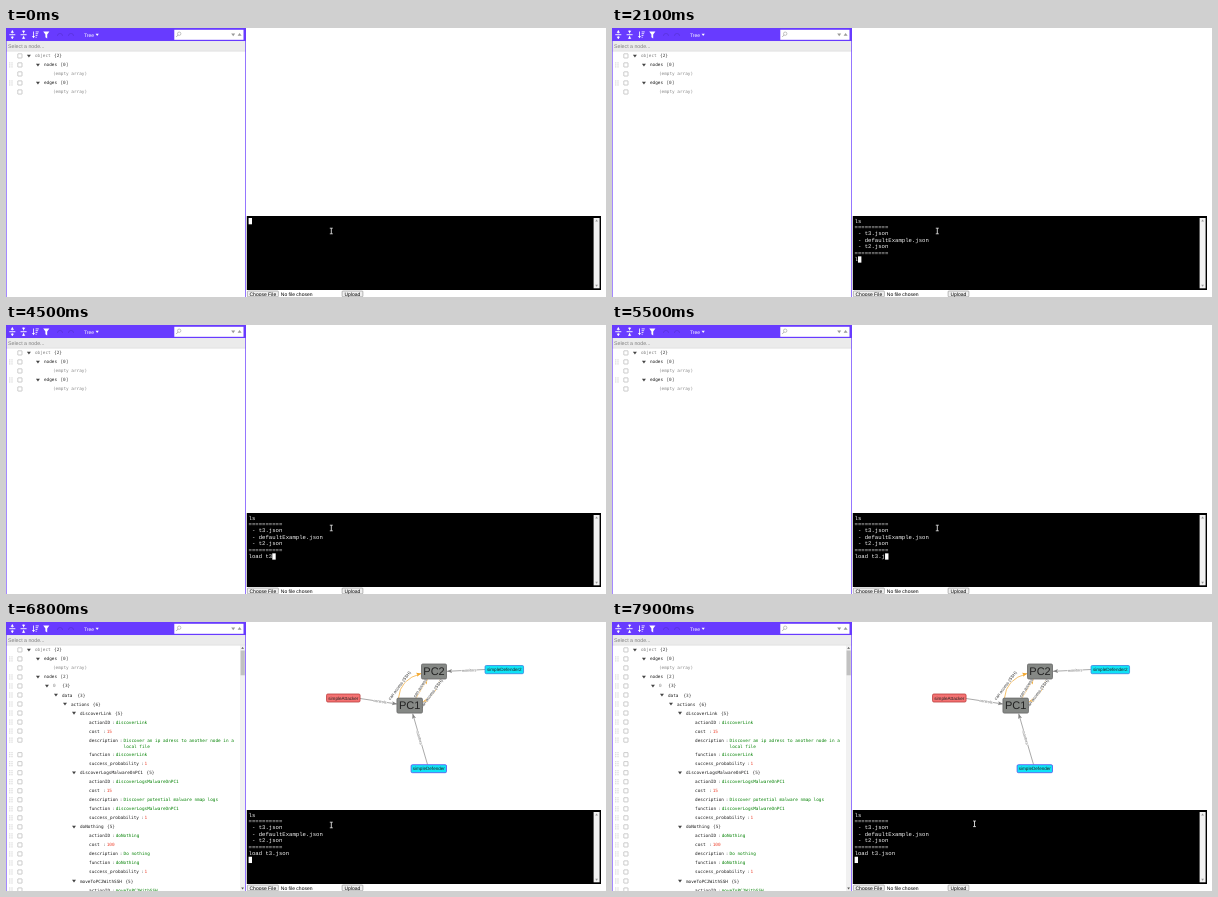
Animation, 600 px wide and 269 px high, one loop 8000 ms. Source, as an HTML page with a canvas:

```html
<!DOCTYPE html>
<html lang="en">
<head>
<meta charset="utf-8">
<title>Graph editor</title>
<style>
html, body { margin: 0; width: 100%; height: 100%; overflow: hidden; background: #fff; }
canvas { display: block; }
</style>
</head>
<body>
<canvas id="stage" width="600" height="269"></canvas>
<script>
const ctx = document.getElementById("stage").getContext("2d");
ctx.textRendering = "geometricPrecision";

const LOOP = 8000, LOADED = 6800;
const PURPLE = "#683bff", GREY = "#848484", ORANGE = "#f2a62b";
const SANS = '"Liberation Sans", Arial, sans-serif';
const TREE = '4.37px "DejaVu Sans Mono", monospace';
const TERM = '5.64px "Liberation Mono", monospace';
const CHAR = 2.63, ROW = 9.02;

function text(s, x, y, color, font, align = "left") {
  ctx.font = font;
  ctx.fillStyle = color;
  ctx.textAlign = align;
  ctx.fillText(s, x, y);
}
function rect(x, y, w, h, color) {
  ctx.fillStyle = color;
  ctx.fillRect(x, y, w, h);
}
function poly(color, ...points) {
  ctx.beginPath();
  for (let i = 0; i < points.length; i += 2) ctx.lineTo(points[i], points[i + 1]);
  ctx.fillStyle = color;
  ctx.fill();
}
function line(color, width, ...points) {
  ctx.beginPath();
  for (let i = 0; i < points.length; i += 2) ctx.lineTo(points[i], points[i + 1]);
  ctx.strokeStyle = color;
  ctx.lineWidth = width;
  ctx.stroke();
}
function box(x, y, w, h, fill, stroke, width, radius) {
  ctx.beginPath();
  ctx.roundRect(x, y, w, h, radius);
  ctx.fillStyle = fill;
  ctx.fill();
  ctx.strokeStyle = stroke;
  ctx.lineWidth = width;
  ctx.stroke();
}
// Triangle of half width r; dir 1 points down, -1 up
function tri(x, y, r, dir, color) {
  poly(color, x - r, y - dir * r * 0.6, x + r, y - dir * r * 0.6, x, y + dir * r * 0.8);
}

function toolbar() {
  rect(0, 0, 240, 13.2, PURPLE);
  for (const [x, dir] of [[6.3, 1], [17.6, -1]]) {
    line("#fff", 0.9, x - 3, 6.7, x + 3, 6.7);
    for (const side of [-1, 1]) {
      tri(x, 6.7 + side * 3, 1.7, side * dir, "#fff");
      line("#fff", 0.7, x, 6.7 + side * 1.2, x, 6.7 + side * 4.3);
    }
  }
  line("#fff", 0.8, 27.5, 3.5, 27.5, 9);
  tri(27.5, 9, 1.5, 1, "#fff");
  for (let i = 0; i < 4; i++) line("#fff", 0.8, 29.6, 3.9 + i * 1.8, 32.8 - i * 0.7, 3.9 + i * 1.8);
  poly("#fff", 37.2, 3.4, 43.4, 3.4, 41.2, 6.6, 41.2, 10.4, 39.4, 9.2, 39.4, 6.6);
  ctx.globalAlpha = 0.12;
  for (const x of [54, 65]) {
    ctx.beginPath();
    ctx.arc(x, 8, 2.6, Math.PI, 0);
    ctx.lineWidth = 0.9;
    ctx.strokeStyle = "#000";
    ctx.stroke();
  }
  ctx.globalAlpha = 1;
  text("Tree", 78, 8.6, "#fff", "5.01px " + SANS);
  tri(91.2, 6.8, 1.6, 1, "#fff");

  rect(168.3, 1.8, 69.2, 10, "#fff");
  ctx.beginPath();
  ctx.arc(173.2, 5.7, 1.7, 0, 7);
  ctx.strokeStyle = "#aaa";
  ctx.lineWidth = 0.7;
  ctx.stroke();
  line("#aaa", 0.8, 172, 7, 170.2, 9);
  tri(227.2, 6.6, 2, 1, "#999");
  tri(233.6, 6.6, 2, -1, "#999");

  rect(0, 13.2, 240, 10, "#ebebeb");
  line("#d3d3d3", 0.5, 0, 23.2, 240, 23.2);
  text("Select a node...", 2, 20.2, "#808080", "5.26px " + SANS);
}

// Rows: [level, name, value]; a value in brackets is a child count
const emptyRow = [2, "", "(empty array)"];
const blankTree = [[0, "object", "{2}"], [1, "nodes", "[0]"], emptyRow, [1, "edges", "[0]"], emptyRow];

const action = (name, cost, description) => [
  [5, name, "{5}"],
  [6, "actionID", name],
  [6, "cost", cost],
  [6, "description", description],
  [6, "function", name],
  [6, "success_probability", 1],
];
const fullTree = [
  [0, "object", "{2}"], [1, "edges", "[0]"], emptyRow, [1, "nodes", "[2]"],
  [2, "0", "{3}"], [3, "data", "{3}"], [4, "actions", "{6}"],
  ...action("discoverLink", 15, "Discover an ip adress to another node in a\nlocal file"),
  ...action("discoverLogsMalwareOnPC1", 15, "Discover potential malware nmap logs"),
  ...action("doNothing", 100, "Do nothing"),
  ...action("moveToPC2WithSSH", 15, "Move").slice(0, 2),
];

function drawTree(rows) {
  let y = 27.9;
  for (const [level, name, value] of rows) {
    const x = 28.9 + level * ROW, base = y + 1.5;
    const branch = /^[{[]/.test(value);
    box(11.8, y - 2.1, 4.2, 4.2, "#fff", "#aaa", 0.6, 0.3);
    if (level && name) {
      for (let i = 0; i < 6; i++) rect(3.3 + (i % 2) * 2.2, y - 2.5 + (i >> 1) * 2, 1, 1, "#c4c4c4");
    }
    if (branch) tri(x - 6, y, 2, 1, "#444");

    const isIndex = name === "0";
    const end = x + Math.max(isIndex ? 6 : 12.03, name.length * CHAR);
    text(name, x, base, isIndex || !level ? "#808080" : "#1a1a1a", TREE);
    if (!name) {
      text(value, x, base, "#888", TREE);
    } else if (branch) {
      text(value, end + 3.4, base, "#333", TREE);
    } else {
      text(":", end + 1.9, base, "#555", TREE);
      const color = typeof value === "number" ? "#ee422e" : "#008000";
      String(value).split("\n").forEach((part, i) => {
        if (i) y += 5.6;
        text(part, end + 5.6, base + i * 6, color, TREE);
      });
    }
    y += ROW;
  }
}

function treeScrollbar() {
  rect(234, 23.4, 5.2, 246, "#f1f1f1");
  rect(234.6, 28.5, 4.2, 24.8, "#c1c1c1");
  tri(236.6, 26, 1.4, -1, "#555");
  tri(236.6, 266.3, 1.4, 1, "#555");
}

function arrowHead(x, y, angle, color) {
  ctx.save();
  ctx.translate(x, y);
  ctx.rotate(angle);
  poly(color, 0, 0, -5, -2, -4, 0, -5, 2);
  ctx.restore();
}
function edge(x1, y1, cx, cy, x2, y2, color) {
  ctx.beginPath();
  ctx.moveTo(x1, y1);
  ctx.quadraticCurveTo(cx, cy, x2, y2);
  ctx.strokeStyle = color;
  ctx.lineWidth = 0.7;
  ctx.stroke();
  arrowHead(x2, y2, Math.atan2(y2 - cy, x2 - cx), color);
}
function edgeLabel(s, x, y, degrees, size, color) {
  ctx.save();
  ctx.translate(x, y);
  ctx.rotate(degrees * Math.PI / 180);
  ctx.font = size + "px " + SANS;
  ctx.textAlign = "center";
  ctx.strokeStyle = "#fff";
  ctx.lineWidth = 1;
  ctx.strokeText(s, 0, size * 0.35);
  text(s, 0, size * 0.35, color, ctx.font, "center");
  ctx.restore();
}
function node(label, x, y, w, h, fill, stroke, size) {
  box(x - w / 2, y - h / 2, w, h, fill, stroke, 0.8, 1.3);
  text(label, x, y + size * 0.35, "#222", size + "px " + SANS, "center");
}

function graph() {
  edge(354, 76.5, 372, 79.2, 391, 82, GREY);
  edge(479, 47.5, 460, 48.4, 441, 49.3, GREY);
  edge(421.5, 142.5, 414, 117, 406.7, 91.7, GREY);
  edge(392.5, 76, 394, 57, 415.3, 51.5, ORANGE);
  edge(410, 76, 416, 66, 421.5, 57.3, ORANGE);
  edge(434, 57, 430, 74, 417, 80, ORANGE);
  edgeLabel("controls", 374, 79.4, 8.5, 3.8, "#666");
  edgeLabel("monitors", 463, 48.3, -2.7, 3.8, "#666");
  edgeLabel("monitors", 413.4, 115.5, 74, 3.8, "#666");
  edgeLabel("can access (SSH)", 393.5, 63.5, -53, 4.3, "#333");
  edgeLabel("can access", 414, 66, -57, 4.3, "#333");
  edgeLabel("can access (SSH)", 425.5, 71.5, -53, 4.3, "#333");
  node("PC2", 428, 49.5, 25, 15, "#858885", "#666", 11);
  node("PC1", 403.7, 83.6, 25.5, 15, "#858885", "#666", 11);
  node("simpleAttacker", 337.3, 76, 33.5, 8, "#f47272", "#b83c3c", 4.6);
  node("simpleDefender2", 498.3, 47.6, 38.5, 8.2, "#0fe3f5", "#3c82e0", 4.6);
  node("simpleDefender", 422.8, 146.7, 35.4, 8, "#0fe3f5", "#5a50ee", 4.6);
}

const listing = "==========\n - t3.json\n - defaultExample.json\n - t2.json\n==========\n";
const listKeys = [700, 1100, 1300];
const loadKeys = [2100, 2800, 3000, 3300, 3500, 3900, 4500, 5100, 5500, 5700, 5700, 5900, 6500];
const typed = (s, keys, t) => s.slice(0, keys.filter(k => k <= t).length);

function terminal(t) {
  rect(240.8, 188, 354.2, 74, "#000");
  rect(587.6, 190, 6, 70.3, "#f1f1f1");
  tri(590.6, 192.7, 1.4, -1, "#999");
  tri(590.6, 257.6, 1.4, 1, "#999");

  const out = typed("ls\n", listKeys, t) + (t >= 1400 ? listing : "") + typed("load t3.json\n", loadKeys, t);
  const lines = out.split("\n");
  lines.forEach((s, i) => text(s, 242.5, 194.7 + i * 6.39, "#f4f4f4", TERM));
  const last = lines.length - 1;
  rect(242.6 + lines[last].length * 3.385, 190 + last * 6.39, 3.4, 6.3, "#fff");
}

function uploadForm() {
  const font = "5.01px " + SANS;
  box(241.4, 263, 31, 5.8, "#efefef", "#767676", 0.5, 0.8);
  text("Choose File", 243.5, 267.8, "#000", font);
  text("No file chosen", 274.8, 267.8, "#000", font);
  box(336.1, 263, 20.8, 5.8, "#efefef", "#767676", 0.5, 0.8);
  text("Upload", 338.5, 267.8, "#000", font);
}

function pointer(t) {
  const p = Math.min(1, Math.max(0, (t - 7100) / 800));
  const ease = p * p * (3 - 2 * p);
  const x = 325.3 + 37.2 * ease, y = 203 - 1.2 * ease;
  line("#fff", 0.8, x, y - 2.8, x, y + 2.8);
  for (const dy of [-2.8, 2.8]) line("#fff", 0.7, x - 1.5, y + dy, x + 1.5, y + dy);
}

function draw(now) {
  const t = now % LOOP, loaded = t >= LOADED;
  rect(0, 0, 600, 269, "#fff");
  drawTree(loaded ? fullTree : blankTree);
  if (loaded) {
    treeScrollbar();
    graph();
  }
  toolbar();
  rect(0, 0, 0.6, 269, PURPLE);
  rect(239.3, 0, 0.7, 269, PURPLE);
  terminal(t);
  uploadForm();
  pointer(t);
  requestAnimationFrame(draw);
}
requestAnimationFrame(draw);
</script>
</body>
</html>
```
